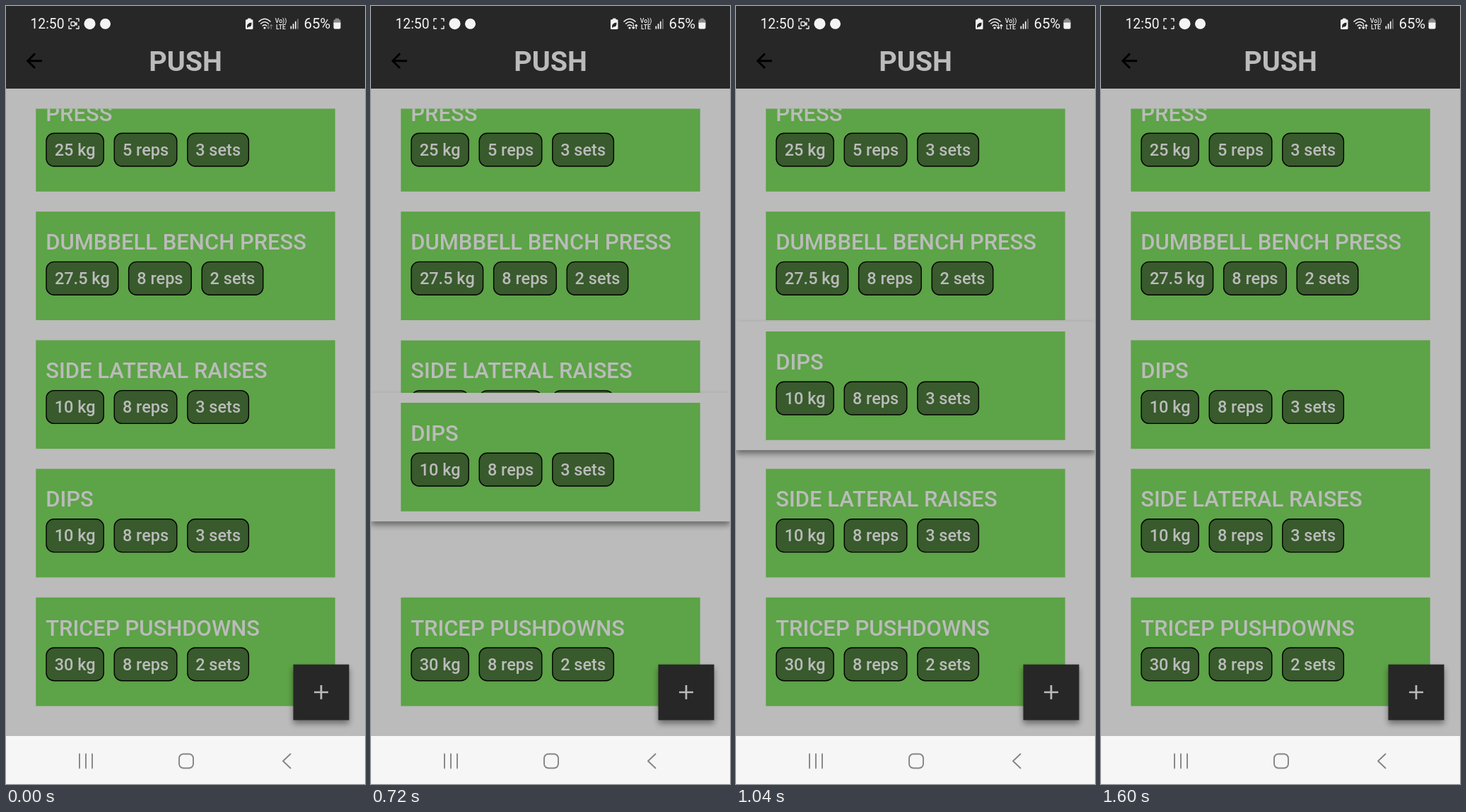
Recreate the animation shown at these times as an HTML page. Size 508 by 1102 pixels, loop 1.68 s.

```html
<!DOCTYPE html>
<html lang="en">
<head>
<meta charset="utf-8">
<title>Push workout</title>
<style>
  html, body { margin: 0; width: 100%; height: 100%; overflow: hidden; background: #bbb; }
  svg { display: block; width: 100%; height: 100%; font-family: Roboto, sans-serif; }
  .head { font-size: 39.5px; font-weight: 700; fill: #bbb; }
  .name { font-size: 31px; font-weight: 500; fill: #bbb; }
  .pill { font-size: 23.5px; font-weight: 500; fill: #bbb; text-anchor: middle; }
  .line { fill: none; stroke-linecap: round; stroke-linejoin: round; }
</style>
</head>
<body>
<svg id="stage" viewBox="0 0 508 1102">
  <defs>
    <clipPath id="view"><rect y="145.5" width="508" height="889"/></clipPath>
    <filter id="soft" x="-50" y="-50" width="608" height="1202" filterUnits="userSpaceOnUse">
      <feGaussianBlur id="blur" stdDeviation="4"/>
    </filter>
    <filter id="fabSoft" x="-30%" y="-30%" width="160%" height="160%">
      <feGaussianBlur stdDeviation="4.5"/>
    </filter>
  </defs>
  <rect width="508" height="1102" fill="#bbb"/>
  <g id="list" clip-path="url(#view)"></g>

  <rect width="508" height="117" fill="#272727"/>
  <text class="head" x="254" y="91.5" text-anchor="middle">PUSH</text>
  <path class="line" style="stroke-linecap:butt;stroke-linejoin:miter" stroke="#000" stroke-width="2.9" d="M51 77.7H31M41 67.4L30.7 77.7L41 88"/>

  <g fill="#f4f4f4">
    <text x="34.5" y="32" font-size="19.3">12:50</text>
    <path class="line" stroke="#f4f4f4" stroke-width="1.4" d="M89 21.5V18H92.5M99.500 18H103V21.5M103 28.500V32H99.500M92.500 32H89V28.500"/>
    <g id="camera" class="line" stroke="#f4f4f4" stroke-width="1.3">
      <rect x="92" y="22.500" width="5.500" height="5.500" rx="1"/>
      <path d="M97.800 25.200L100 23.500V27.200Z"/>
    </g>
    <circle cx="118.500" cy="25.200" r="8"/>
    <circle cx="140.500" cy="25.200" r="7.500"/>

    <path d="M342 19V17.500H346.500V19H348Q349.500 19 349.500 20.500V31.500Q349.500 33 348 33H340.500Q339 33 339 31.500V20.500Q339 19 340.500 19Z"/>
    <path fill="#272727" d="M341 30Q340.500 24 347.500 23.500Q348 30 343 29.500L341.500 31Z"/>
    <g class="line" stroke="#f4f4f4" stroke-width="1.6">
      <path d="M358 22Q366 14.500 374 22M360.600 25Q366 20 371.400 25M363.200 28Q366 25.500 368.800 28"/>
    </g>
    <circle cx="366" cy="31" r="1.600"/>
    <path id="traffic" class="line" stroke-width="1.200" d="M371.300 26.500V32M369.700 30.500L371.300 32.200L372.900 30.500M375.300 32.200V26.500M373.700 28.200L375.300 26.500L376.900 28.200"/>
    <g font-size="8.700" font-weight="500" text-anchor="middle">
      <text x="389" y="24">Vo))</text>
      <text x="389" y="32.500">LTE</text>
    </g>
    <g id="bars"></g>
    <text x="421.500" y="32" font-size="20.300">65%</text>
    <path fill="#8a8a8a" d="M466 19V17.500H471V19Q473.500 19 473.500 21V25H463.500V21Q463.500 19 466 19Z"/>
    <path d="M463.500 23.500H473.500V30.500Q473.500 32.500 471.500 32.500H465.500Q463.500 32.500 463.500 30.500Z"/>
  </g>

  <rect x="406.500" y="938" width="79" height="78.500" fill="#000" opacity=".42" filter="url(#fabSoft)"/>
  <rect x="406.500" y="932.700" width="79" height="78.800" fill="#272727"/>
  <path stroke="#bbb" stroke-width="2.700" d="M436 972H456M446 962V982"/>

  <rect y="1034" width="508" height="68" fill="#f6f6f6"/>
  <g class="line" stroke="#858585" stroke-width="1.900">
    <path d="M104 1059.500V1079.500M113 1059.500V1079.500M122 1059.500V1079.500"/>
    <rect x="245" y="1059.500" width="20" height="20" rx="6"/>
    <path d="M402.500 1059.500L392 1069.500L402.500 1079.500"/>
  </g>
</svg>
<script>
const LOOP = 1680, STEP = 80, PITCH = 182.2, TOP = 109;
const $ = id => document.getElementById(id);

function add(parent, tag, attrs, text) {
  const el = document.createElementNS('http://www.w3.org/2000/svg', tag);
  for (const k in attrs) el.setAttribute(k, attrs[k]);
  if (text) el.textContent = text;
  return parent.appendChild(el);
}

const place = (el, y) => el.setAttribute('transform', `translate(0 ${y})`);
const slot = i => TOP + PITCH * i;

function card(name, kg, reps, sets) {
  const g = add($('list'), 'g', {});
  add(g, 'rect', { x: 42.3, width: 423.4, height: 153.8, fill: '#5da347' });
  add(g, 'text', { class: 'name', x: 56.2, y: 53.8 }, name);
  let x = 57;
  const pills = [[kg + ' kg', String(kg).includes('.') ? 101.6 : 81.2],
                 [reps + ' reps', 88.6], [sets + ' sets', 86.6]];
  for (const [label, w] of pills) {
    add(g, 'rect', { x, y: 71.2, width: w, height: 46.8, rx: 11, fill: '#385a2c', stroke: '#000', 'stroke-width': 1.4 });
    add(g, 'text', { class: 'pill', x: x + w / 2, y: 102.8 }, label);
    x += w + 15;
  }
  return g;
}

place(card('PRESS', 25, 5, 3), slot(0));
place(card('DUMBBELL BENCH PRESS', 27.5, 8, 2), slot(1));
const side = card('SIDE LATERAL RAISES', 10, 8, 3);
place(card('TRICEP PUSHDOWNS', 30, 8, 2), slot(4));
const dips = card('DIPS', 10, 8, 3);
const sheet = { y: -14.1, width: 508, height: 182.2 };
dips.prepend(add(dips, 'rect', { ...sheet, fill: '#bbb' }));
const shade = add(dips, 'rect', { ...sheet, filter: 'url(#soft)' });
dips.prepend(shade);

for (let i = 0; i < 4; i++) {
  const h = 4 + i * 3.4;
  add($('bars'), 'rect', { x: 402.5 + i * 3.2, y: 32.5 - h, width: 1.7, height: h, opacity: i < 3 ? 1 : .4 });
}

const clamp = v => Math.min(1, Math.max(0, v));

// Cubic bezier easing with control points (a, 0) and (b, 1)
function ease(v, a, b) {
  let lo = 0, hi = 1;
  for (let i = 0; i < 24; i++) {
    const s = (lo + hi) / 2, r = 1 - s;
    if (3 * r * r * s * a + 3 * r * s * s * b + s * s * s < v) lo = s; else hi = s;
  }
  return lo * lo * (3 - 2 * lo);
}
const inOut = v => ease(clamp(v), .42, .58);
const out = v => ease(clamp(v), 0, .58);

// Finger path: time, card top
const path = [[320, slot(3)], [400, 653.5], [560, 611.5], [720, 562], [880, 494.5], [1040, 461], [1280, 449], [1400, 449]];
const last = path.length - 1;
function slope(i) {
  if (i === 0 || i >= last - 1) return 0;
  const [a, b] = [path[i - 1], path[i + 1]];
  return (b[1] - a[1]) / (b[0] - a[0]);
}
function finger(t) {
  if (t <= path[0][0]) return path[0][1];
  if (t >= path[last][0]) return path[last][1];
  const i = path.findIndex(p => p[0] > t) - 1;
  const [t0, y0] = path[i], [t1, y1] = path[i + 1];
  const d = t1 - t0, s = (t - t0) / d, r = 1 - s;
  return y0 * r * r * (1 + 2 * s) + y1 * s * s * (3 - 2 * s)
       + d * s * r * (r * slope(i) - s * slope(i + 1));
}

function draw(t) {
  const held = t < 1350 ? (t - 300) / 250 : 1 - (t - 1350) / 250;
  const lift = inOut(held);
  const home = slot(2);
  place(dips, t < 1350 ? finger(t) : home + (finger(t) - home) * out(held));
  place(side, home + PITCH * inOut((t - 713) / 250));

  shade.setAttribute('visibility', lift > 0 ? 'visible' : 'hidden');
  shade.setAttribute('opacity', .44 * Math.sqrt(lift));
  place(shade, 5 * lift);
  $('blur').setAttribute('stdDeviation', .1 + 4.2 * lift);

  const blink = Math.floor((t + 150) / 500) % 2;
  $('camera').setAttribute('visibility', blink ? 'hidden' : 'visible');
  $('traffic').setAttribute('stroke', t < STEP ? '#777' : '#f4f4f4');
}

function tick() {
  const t = (performance.now() + .5) % LOOP;
  draw(Math.floor(t / STEP) * STEP);
  requestAnimationFrame(tick);
}
tick();
</script>
</body>
</html>
```
